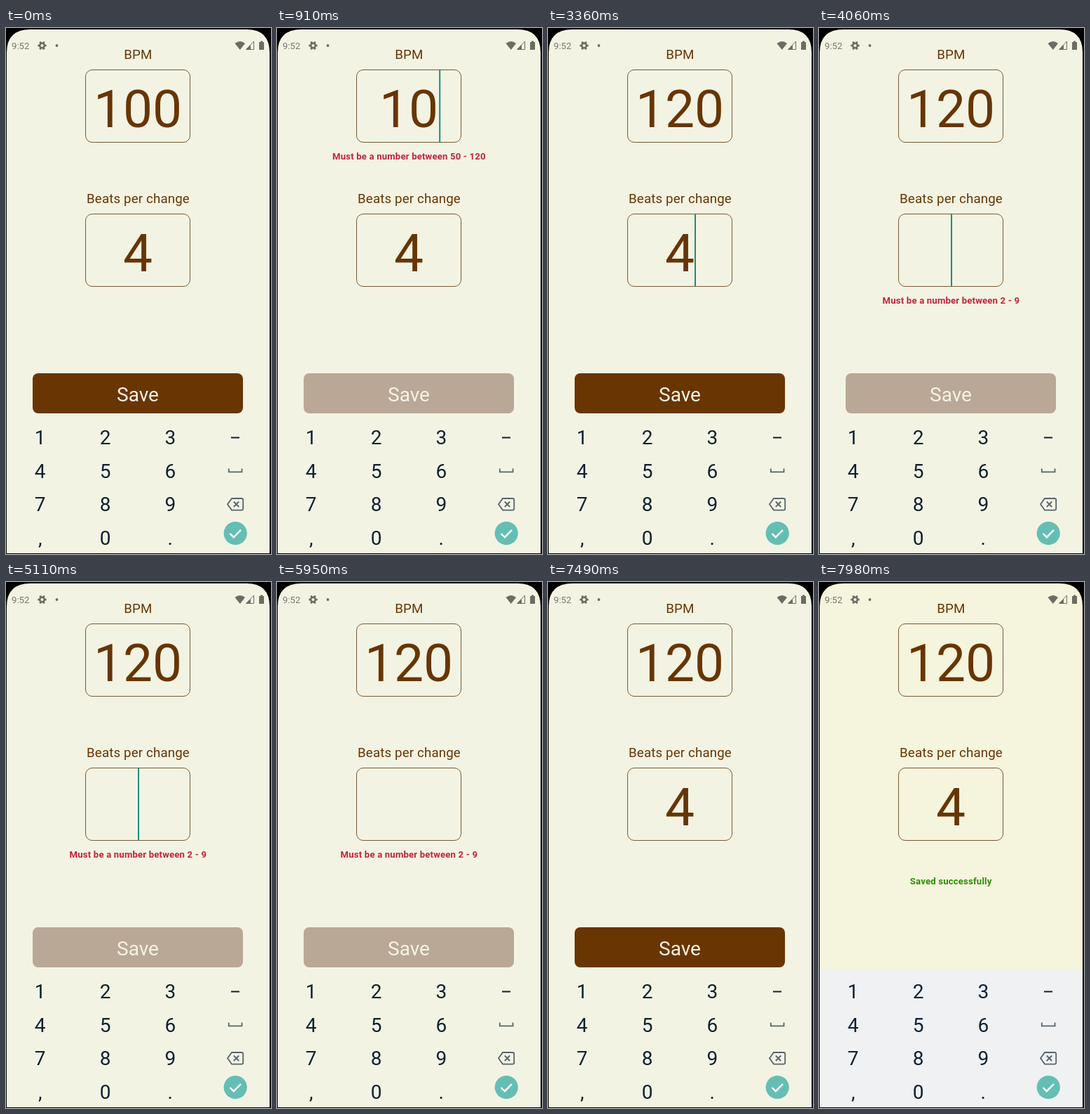
Animation, 378 px wide and 748 px high, one loop 8000 ms. Source, as an HTML page:

```html
<!DOCTYPE html>
<html lang="en">
<head>
<meta charset="utf-8">
<style>
  html, body { margin: 0; width: 100%; height: 100%; overflow: hidden; background: #000; }
  svg { display: block; width: 378px; height: 748px; font-family: Roboto, sans-serif; }
  text { text-anchor: middle; white-space: pre; }
  .label { font-size: 18.7px; letter-spacing: .15px; fill: #673503; }
  .value { font-size: 74.8px; fill: #673503; }
  .box { fill: none; stroke: #765a36; }
  .note { font-size: 13.1px; font-weight: 600; letter-spacing: .2px; }
  .error { fill: #c4213c; }
  .keys { font-size: 28px; fill: #0e2132; }
  .icon { fill: none; stroke: #56646e; stroke-width: 1.8; }
</style>
</head>
<body>
<svg viewBox="0 0 378 748">
  <path id="screen" d="M1 747V35Q1 2 35 2H343Q376 2 376 35V747Z"/>
  <rect id="keyboard" x="1" y="552" width="375" height="195"/>

  <g fill="#6c6c65">
    <text x="8" y="30" font-size="13.2" style="text-anchor:start" fill="#77776f">9:52</text>
    <circle cx="51.5" cy="25" r="3.4" fill="none" stroke="#6c6c65" stroke-width="2.6"/>
    <circle cx="51.5" cy="25" r="5.2" fill="none" stroke="#6c6c65" stroke-width="2"
      pathLength="12" stroke-dasharray="1" stroke-dashoffset=".5"/>
    <circle cx="72.5" cy="25" r="1.9"/>
    <path d="M326.5 22Q334 16 341 22L333.8 31Z"/>
    <path d="M342.5 30.5L353.5 19V30.5Z" fill="none" stroke="#6c6c65"/>
    <path d="M342 31L349 24V31Z"/>
    <path d="M361 20H363V18.5H366V20H368V31H361Z"/>
  </g>

  <text class="label" x="188.3" y="44">BPM</text>
  <rect class="box" x="113.5" y="59.5" width="149" height="103" rx="9.5"/>
  <text class="value" id="bpm" x="188" y="141"/>
  <text class="note error" id="bpmError" x="188.4" y="187">Must be a number between 50 - 120</text>

  <text class="label" x="188.5" y="249">Beats per change</text>
  <rect class="box" x="113.5" y="264.5" width="149" height="103" rx="9.5"/>
  <text class="value" id="beats" x="188" y="346"/>
  <text class="note error" id="beatsError" x="188.4" y="392">Must be a number between 2 - 9</text>

  <rect id="caret" width="2" height="103" fill="#16907a"/>
  <text class="note" id="saved" x="188.2" y="430" fill="#2f8a0b">Saved successfully</text>

  <g id="save">
    <rect id="saveFill" x="38" y="491" width="300" height="57" rx="8"/>
    <text x="188" y="531" font-size="28" fill="#f4f3e2">Save</text>
  </g>

  <g class="keys" id="keys"></g>
  <path d="M321 582.5H333" stroke="#0e2132" stroke-width="2"/>
  <path class="icon" d="M317.8 626.5V631.3H336.5V626.5"/>
  <path class="icon" d="M322 669H336Q338.2 669 338.2 671V683.5Q338.2 685.6 336 685.6H322L316 677.3ZM324.8 673.5L332.2 681M332.2 673.5L324.8 681"/>
  <circle cx="327.2" cy="718.5" r="16.6" fill="#65beb4"/>
  <path d="M319.5 719L324.8 724.2L335 713.8" fill="none" stroke="#fff" stroke-width="2.4"/>
</svg>
<script>
  const LOOP = 8000, BLINK = 560, SAVED_AT = 7700;
  const bpmEdits = [[0, '100'], [700, '10'], [980, '1'], [1400, '12'], [1820, '120']];
  const beatsEdits = [[0, '4'], [3990, ''], [6440, '4']];
  // Each entry restarts the caret's blink.
  const caretResets = [210, 700, 980, 1400, 1820, 3010, 3990, 6440];

  const $ = id => document.getElementById(id);
  const show = (id, on) => $(id).setAttribute('visibility', on ? 'visible' : 'hidden');
  const latest = (edits, t) => edits.filter(([at]) => at <= t).pop()[1];
  const within = (t, from, to) => t >= from && t < to;

  ['123', '456', '789', ',0.'].forEach((row, r) => [...row].forEach((key, c) => {
    const text = document.createElementNS('http://www.w3.org/2000/svg', 'text');
    text.setAttribute('x', 48.7 + c * 92.8);
    text.setAttribute('y', 592 + r * 47.7);
    text.textContent = key;
    $('keys').append(text);
  }));

  function drawCaret(t, bpm, beats) {
    const start = caretResets.filter(at => at <= t).pop();
    const on = start !== undefined && t < SAVED_AT && Math.floor((t - start) / BLINK) % 2 === 0;
    const inBeats = t >= 3010;
    const value = inBeats ? beats : bpm;
    $('caret').setAttribute('x', 188 + value.length * 21 + (inBeats ? 0 : 1.2));
    $('caret').setAttribute('y', inBeats ? 264.5 : 59.5);
    show('caret', on);
  }

  function render(t) {
    const bpm = latest(bpmEdits, t), beats = latest(beatsEdits, t);
    const bpmBad = within(t, 770, 1890), beatsBad = within(t, 4060, 6510);
    const saved = t >= SAVED_AT;
    $('bpm').textContent = bpm;
    $('beats').textContent = beats;
    show('bpmError', bpmBad);
    show('beatsError', beatsBad);
    show('saved', saved);
    show('save', !saved);
    $('saveFill').setAttribute('fill', bpmBad || beatsBad ? '#b9a895' : '#693502');
    $('screen').setAttribute('fill', saved ? '#f5f4dc' : '#f3f3e3');
    $('keyboard').setAttribute('fill', saved ? '#eff1f2' : '#f3f3e3');
    drawCaret(t, bpm, beats);
  }

  const origin = performance.now();
  function tick() {
    render((performance.now() - origin) % LOOP);
    requestAnimationFrame(tick);
  }
  tick();
</script>
</body>
</html>
```
